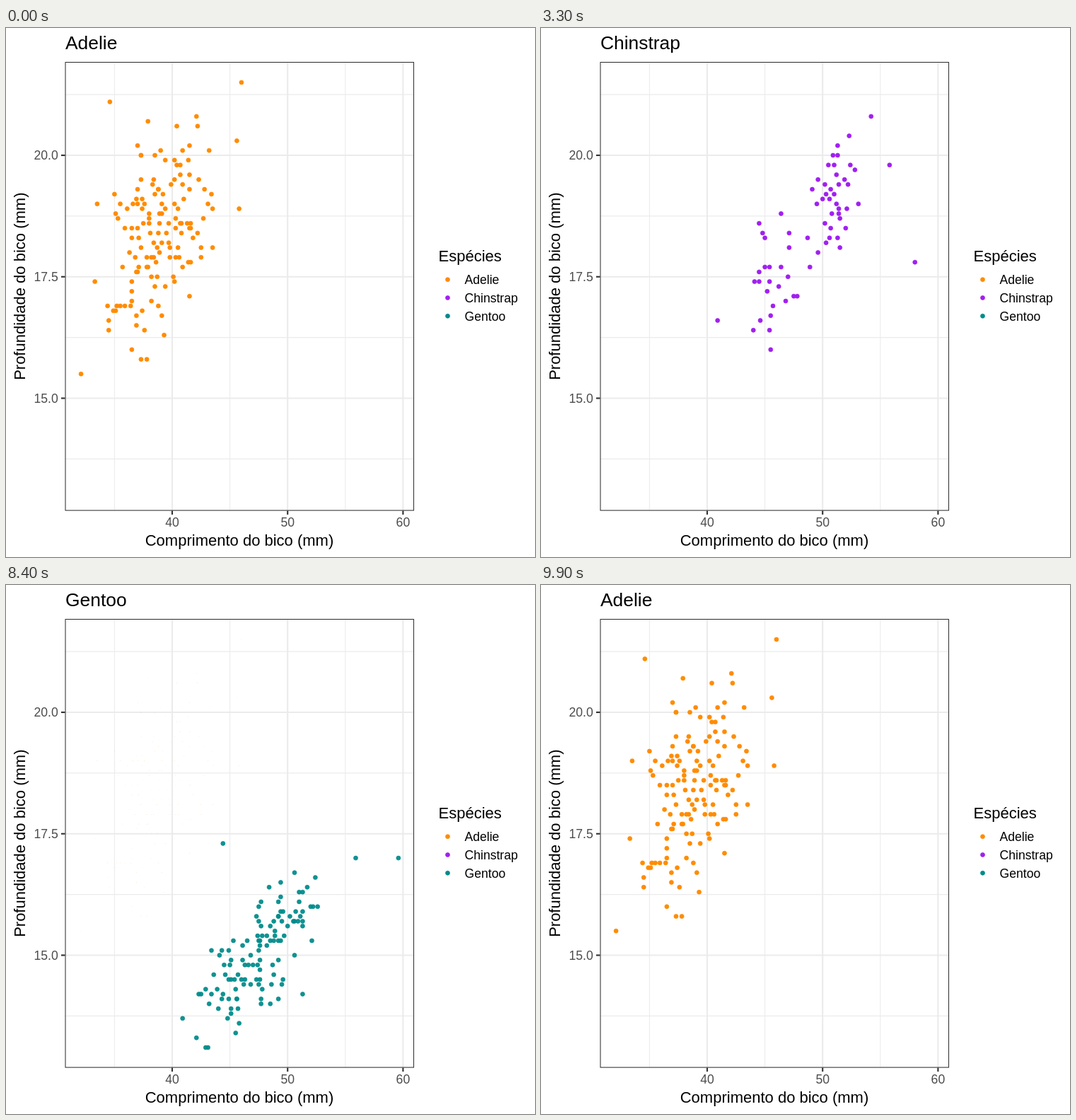
An HTML page for the animation above (10000 ms loop, 748 px wide and 748 px high).

```html
<!DOCTYPE html>
<html lang="pt">
<head>
<meta charset="utf-8">
<title>Espécies</title>
<style>
  html, body { margin: 0; width: 100%; height: 100%; overflow: hidden; background: #fff; }
  svg { display: block; width: 100%; height: 100%; font-family: "Liberation Sans", Arial, sans-serif; }
</style>
</head>
<body>
<svg id="plot" viewBox="0 0 748 748"></svg>
<script>
const svg = document.getElementById('plot');
const LOOP = 10000, STEP = 100, RADIUS = 3, STROKE = 0.71;
const GOLDEN = Math.PI * (3 - Math.sqrt(5));
const px = v => 235 + (v - 40) * 16.32;
const py = v => 180 + (20 - v) * 68.7;

// outliers stand apart; each cloud is a correlated normal spread cut off at `cut` deviations
const species = [
  { name: 'Adelie', color: '#ff8c00',
    outliers: [[32.1, 15.5], [33.5, 19], [34.6, 21.1], [46, 21.5], [45.6, 20.3], [45.8, 18.9]],
    clouds: [{ n: 140, x: 38.8, y: 18.35, sx: 2.6, sy: 1.22, corr: 0.35, cut: 2.2 }] },
  { name: 'Chinstrap', color: '#a020f0',
    outliers: [[40.9, 16.6], [58, 17.8], [55.8, 19.8], [54.2, 20.8]],
    clouds: [{ n: 26, x: 46, y: 17.55, sx: 1.7, sy: 0.8, corr: 0.3, cut: 2 },
             { n: 37, x: 50.9, y: 19.1, sx: 1.2, sy: 0.75, corr: 0.35, cut: 2 }] },
  { name: 'Gentoo', color: '#008b8b',
    outliers: [[40.9, 13.7], [42.9, 13.1], [44.4, 17.3], [51.3, 14.2], [55.9, 17], [59.6, 17]],
    clouds: [{ n: 115, x: 47.4, y: 14.98, sx: 2.9, sy: 0.97, corr: 0.68, cut: 2 }] }
];

// Moves from one species to the next, in even steps
const moves = [
  { start: 1700, steps: 17, from: 0, to: 1 },
  { start: 5000, steps: 17, from: 1, to: 2 },
  { start: 8400, steps: 16, from: 2, to: 0 }
];

function add(parent, tag, attrs, text) {
  const el = document.createElementNS('http://www.w3.org/2000/svg', tag);
  for (const k in attrs) el.setAttribute(k, attrs[k]);
  if (text) el.textContent = text;
  parent.appendChild(el);
  return el;
}

const line = (x1, y1, x2, y2, stroke, width) =>
  add(svg, 'line', { x1, y1, x2, y2, stroke, 'stroke-width': width });

const label = (text, x, y, size, attrs) =>
  add(svg, 'text', { x, y, 'font-size': size, ...attrs }, text);

const dot = (parent, cx, cy, attrs) =>
  add(parent, 'circle', { cx, cy, r: RADIUS, ...attrs });

function random(seed) {
  return () => {
    seed = (seed + 0x6D2B79F5) | 0;
    let t = Math.imul(seed ^ seed >>> 15, 1 | seed);
    t = t + Math.imul(t ^ t >>> 7, 61 | t) ^ t;
    return ((t ^ t >>> 14) >>> 0) / 4294967296;
  };
}

// Even shares of the normal radius on a jittered golden spiral, rounded like the measurements
function scatter({ n, x, y, sx, sy, corr, cut }, rnd) {
  const inside = 1 - Math.exp(-cut * cut / 2), rest = Math.sqrt(1 - corr * corr);
  const round = v => Math.round(v * 10) / 10;
  return Array.from({ length: n }, (_, i) => {
    const len = Math.sqrt(-2 * Math.log(1 - inside * (i + rnd()) / n));
    const angle = i * GOLDEN + rnd() * 1.6;
    const u = len * Math.cos(angle), v = len * Math.sin(angle);
    return [round(x + sx * u), round(y + sy * (corr * u + rest * v))];
  });
}

function drawPlot() {
  const L = 83.5, R = 577, T = 48, B = 682.6, grid = '#ebebeb', dark = '#333';
  const tick = { fill: '#4d4d4d' }, mid = { 'text-anchor': 'middle' };
  for (let v = 35; v <= 55; v += 10) line(px(v), T, px(v), B, grid, 1.07);
  for (let v = 13.75; v < 22; v += 2.5) line(L, py(v), R, py(v), grid, 1.07);
  for (let v = 15; v <= 20; v += 2.5) {
    line(L, py(v), R, py(v), grid, 2.13);
    line(L - 5.5, py(v), L, py(v), dark, 2.13);
    label(v.toFixed(1), 73.7, py(v) + 6.2, 17.6, { ...tick, 'text-anchor': 'end' });
  }
  for (let v = 40; v <= 60; v += 10) {
    line(px(v), T, px(v), B, grid, 2.13);
    line(px(v), B, px(v), B + 5.5, dark, 2.13);
    label(String(v), px(v), 705.2, 17.6, { ...tick, ...mid });
  }
  label('Comprimento do bico (mm)', 330, 732, 22, mid);
  label('Profundidade do bico (mm)', 0, 0, 22, { ...mid, transform: 'translate(27 365.2) rotate(-90)' });
  label('Espécies', 611.5, 329.5, 22);

  const rnd = random(7);
  species.forEach((s, i) => {
    const y = 355.7 + i * 25.8, paint = { fill: s.color, stroke: s.color };
    dot(svg, 624.5, y, { ...paint, 'stroke-width': STROKE });
    label(s.name, 648.5, y + 6.3, 17.6);
    s.group = add(svg, 'g', paint);
    const points = s.clouds.reduce((all, c) => all.concat(scatter(c, rnd)), s.outliers);
    s.dots = points.map(([a, b]) => dot(s.group, px(a), py(b)));
  });
  add(svg, 'rect', { x: L + 0.5, y: T + 0.5, width: R - L - 1, height: B - T - 1,
    fill: 'none', stroke: dark, 'stroke-width': 1.07 });
}

function show(s, size, alpha) {
  s.group.setAttribute('display', size * alpha > 0 ? 'inline' : 'none');
  s.group.setAttribute('fill-opacity', alpha);
  s.group.setAttribute('stroke-opacity', alpha);
  s.group.setAttribute('stroke-width', STROKE * size);
  for (const d of s.dots) d.setAttribute('r', RADIUS * size);
}

function render(time) {
  let current = 0, move = null;
  let p = 0;
  for (const m of moves) {
    if (time < m.start) break;
    p = Math.min(1, ((time - m.start) / STEP + 1) / m.steps);
    move = p < 1 ? m : null;
    current = p < 0.5 ? m.from : m.to;
  }
  title.textContent = species[current].name;
  species.forEach((s, i) => {
    if (!move) show(s, i === current ? 1 : 0, 1);
    else if (i === move.from) show(s, 1, 1 - p);
    else show(s, i === move.to ? p : 0, 1);
  });
}

drawPlot();
const title = label('', 84, 30, 26.4);
const begin = performance.now();
let last = -1;
function loop() {
  const time = Math.floor((performance.now() - begin) % LOOP / STEP) * STEP;
  if (time !== last) render(last = time);
  requestAnimationFrame(loop);
}
loop();
</script>
</body>
</html>
```
